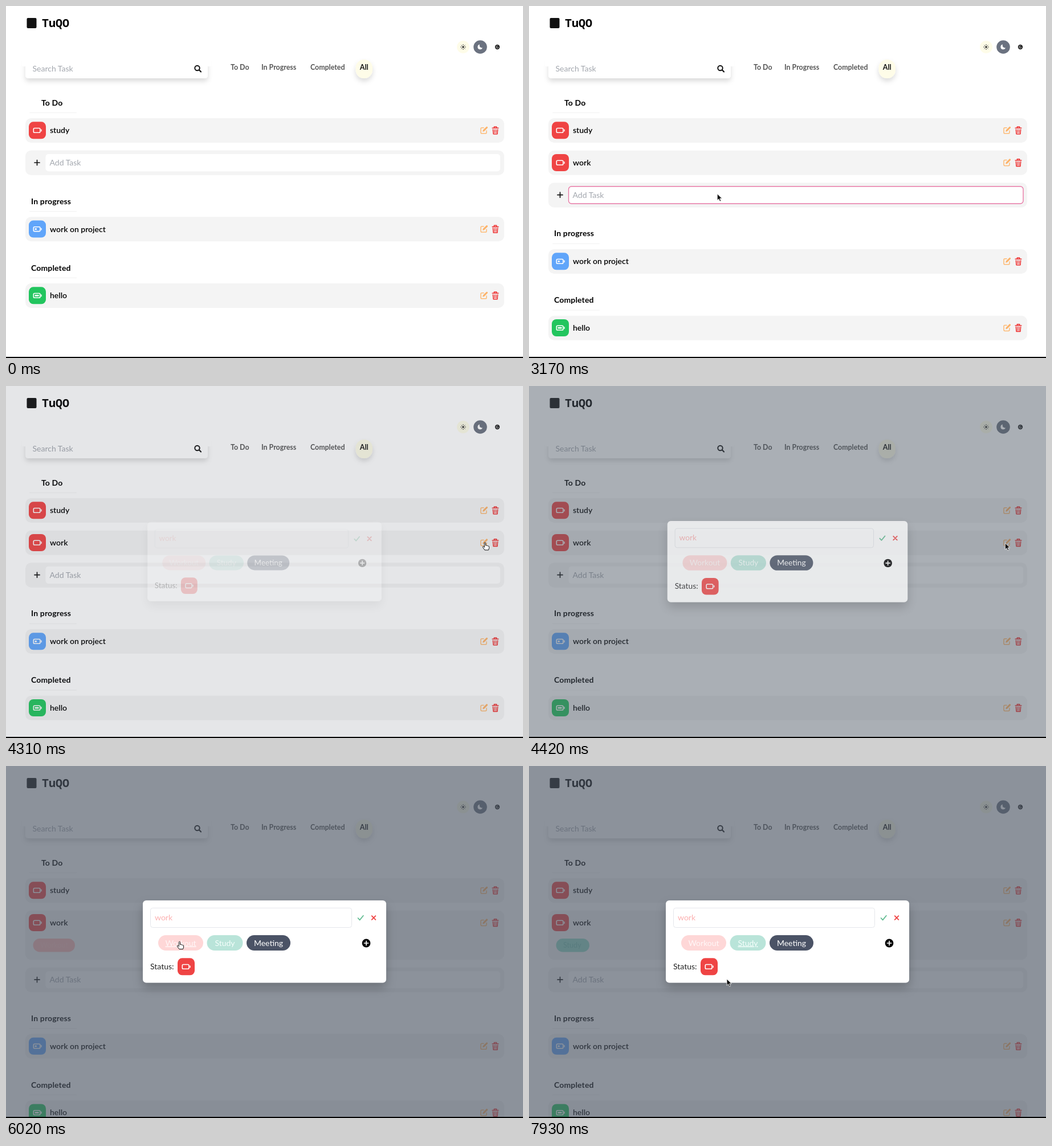
These frames come from a looping animation (907x618 px, 8000 ms). An HTML page:

```html
<!DOCTYPE html>
<html lang="en">
<head>
<meta charset="utf-8">
<title>Task list</title>
<style>
  html, body { margin: 0; width: 100%; height: 100%; overflow: hidden; background: #fff; }
  svg { display: block; width: 100%; height: 100%; }
  text { font: 400 14px Lato, "Open Sans", sans-serif; white-space: pre; }
  .semi { font-weight: 600; }
  .bold { font-weight: 700; letter-spacing: .15px; }
  .nav { font-size: 12.4px; font-weight: 700; fill: #555; }
  .hint { fill: #a3a7ae; }
  .brand { font: 700 20px "Noto Sans Mono", "DejaVu Sans Mono", monospace; }
  .line { fill: none; stroke-linecap: round; stroke-linejoin: round; }
</style>
</head>
<body>
<svg id="stage" viewBox="0 0 907 618" xmlns="http://www.w3.org/2000/svg"></svg>
<script>
const LOOP = 8000;
const RED = '#ef4444', BLUE = '#60a5fa', GREEN = '#22c55e';
const ADD_SHIFT = 56.7, TAG_SHIFT = 43.5;
const T = { focus: 930, type: 2030, added: 2670, move: 3030, click: 4250,
            fade: 4275, workout: 5930, study: 6960 };

const text = (x, y, s, attrs = '') => `<text x="${x}" y="${y}" ${attrs}>${s}</text>`;
const box = (x, y, w, h, r, fill, attrs = '') =>
  `<rect x="${x}" y="${y}" width="${w}" height="${h}" rx="${r}" fill="${fill}" ${attrs}/>`;
const circle = (x, y, r, fill, attrs = '') =>
  `<circle cx="${x}" cy="${y}" r="${r}" fill="${fill}" ${attrs}/>`;
const line = (d, color, w, attrs = '') =>
  `<path class="line" d="${d}" stroke="${color}" stroke-width="${w}" ${attrs}/>`;

// Status button with a battery holding `level` px of charge
const status = (x, y, color, level) =>
  box(x, y, 30, 30, 8, color) +
  box(x + 8.3, y + 11.2, 11.6, 7.8, 1.8, 'none', 'stroke="#fff" stroke-width="1.6"') +
  line(`M${x + 22} ${y + 13.8}v2.6`, '#fff', 1.5) +
  (level ? box(x + 10.6, y + 13.7, level, 2.8, .5, '#fff') : '');

const tools = y =>
  line(`M838 ${y - 4.6}h-3.2q-1.8 0-1.8 1.8v6.4q0 1.8 1.8 1.8h6.4q1.8 0 1.8-1.8v-3`, '#fdba74', 1.5) +
  `<path d="M836.2 ${y + 2.4}l.6-2.9 5.9-5.9q1.2-.6 2 .3q.8.9.2 1.9l-5.9 5.9z" fill="#fdb36a"/>` +
  line(`M853.2 ${y - 4}h10.6M856.4 ${y - 4.3}v-2h4.2v2`, '#e33', 1.6) +
  line(`M854.4 ${y - 1.6}l.7 8h6.8l.7-8`, '#e33', 1.6) +
  line(`M857.2 ${y - 1.5}v5.8M859.8 ${y - 1.5}v5.8`, '#e33', 1.3);

const row = (y, label, color, level, id = '') =>
  box(34, y, 840, 43, 10, '#f4f4f4', id && `id="${id}"`) +
  status(40, y + 6.3, color, level) +
  text(77, y + 26.2, label, 'class="semi"') + tools(y + 21.3);

const heading = (x, y, label) =>
  text(x, y, label, 'class="bold"') + box(41, y + 12.2, 83, 1, .5, '#f1f1f1');

const tag = (id, w, label, fill, ink) =>
  `<g id="${id}">` + box(47.5, 303, w, 23.5, 11.7, fill) +
  text(60, 319, label, `fill="${ink}" style="font-size:12.6px"`) + '</g>';

const pill = (x, w, label, fill, ink, id) =>
  box(x, 297, w, 27, 13.5, fill) +
  text(x + w / 2, 315.6, label, `id="${id}" fill="${ink}" text-anchor="middle"`);

const shadow = (id, dy, blur, alpha) =>
  `<filter id="${id}" x="-30%" y="-60%" width="160%" height="240%">
    <feDropShadow dx="0" dy="${dy}" stdDeviation="${blur}" flood-color="#000" flood-opacity="${alpha}"/></filter>`;

const rays = Array.from({ length: 8 }, (_, i) => {
  const a = i * Math.PI / 4, c = Math.cos(a), s = Math.sin(a);
  return `M${802 + 3.3 * c} ${72 + 3.3 * s}L${802 + 4.3 * c} ${72 + 4.3 * s}`;
}).join('');

const header =
  box(36.5, 21, 17, 18, 2, '#111') + text(63, 37, 'TuQO', 'class="brand"') +
  circle(802, 72, 11, '#fefce8') + circle(802, 72, 1.8, '#222') + line(rays, '#222', 1) +
  circle(832, 72, 11.8, '#6b7280') +
  '<path d="M831 67.6a4.4 4.4 0 1 0 5 5.7a4.2 4.2 0 0 1-5-5.7z" fill="#fff"/>' +
  circle(862, 72, 4.2, '#222') + line('M862.3 70a2 2 0 1 0 1.6 2.4', '#ccc', 1) +
  box(34, 94, 320, 33, 5, '#fff', 'filter="url(#soft)"') + box(28, 84, 332, 22, 0, '#fff') +
  text(46.5, 115, 'Search Task', 'class="hint"') +
  circle(335.5, 109, 4.2, 'none', 'stroke="#111" stroke-width="2"') + line('M338.8 112.3l3.2 3.2', '#111', 2.2) +
  text(394, 112, 'To Do', 'class="nav"') + text(448, 112, 'In Progress', 'class="nav"') +
  text(534, 112, 'Completed', 'class="nav"') +
  box(613.5, 94, 29.5, 33, 14.7, '#fefce8', 'filter="url(#soft)"') +
  text(628.2, 112, 'All', 'class="nav" text-anchor="middle" style="fill:#111"');

const page = header +
  heading(62, 174.6, 'To Do') + row(197, 'study', RED, 0) +
  '<g id="work">' + row(253.7, 'work', RED, 0, 'workBox') +
  tag('tagWorkout', 73.5, 'Workout', '#fdb8b5', '#fdc0bd') +
  tag('tagStudy', 58.5, 'Study', '#8fd9c6', '#6fbfae') + '</g>' +
  '<g id="lower">' + box(34, 253.5, 840, 43.5, 10, '#f4f4f4') +
  line('M50 275h9M54.5 270.5v9', '#111', 1.7) +
  box(69.5, 260, 797.5, 30.3, 5, '#fff', 'id="field" stroke-width="1.4"') +
  text(76.5, 280, 'Add Task', 'id="entry"') +
  heading(44, 347.8, 'In progress') + row(370.3, 'work on project', BLUE, 3.2) +
  heading(44, 464.6, 'Completed') + row(487, 'hello', GREEN, 7) + '</g>';

const modal =
  box(240, 236, 427, 144.5, 6, '#fff', 'filter="url(#deep)"') +
  box(253.5, 249.3, 353, 34.2, 4, '#fff', 'stroke="#e5e7eb"') +
  text(261, 271, 'work', 'fill="#fcb0b0"') +
  line('M617.6 267l3 3.4 6.2-7.6', '#63bd93', 1.8) +
  line('M641.7 263.2l6.6 6.6M648.3 263.2l-6.6 6.6', RED, 1.9) +
  pill(267, 79, 'Workout', '#fed7d7', '#fff7f7', 'pillWorkout') +
  pill(352.5, 63, 'Study', '#b9e4d9', '#f6fffc', 'pillStudy') +
  pill(422, 77, 'Meeting', '#4b5366', '#fff', 'pillMeeting') +
  circle(632, 311, 7.4, '#000') + line('M628.4 311h7.2M632 307.4v7.2', '#fff', 1.7) +
  text(253, 357, 'Status:', 'fill="#222"') + status(301, 337.3, RED, 0);

const cursors =
  `<g id="cursor">
    <path id="arrow" d="M0 0v11.4l2.7-2.5 1.9 4.3 2-.9-1.9-4.2h3.7z" fill="#111" stroke="#fff" stroke-width=".8"/>
    <path id="beam" class="line" d="M-2.5-6q2.5 0 2.5 1.6v8.8q0 1.6-2.5 1.6M2.5-6q-2.5 0-2.5 1.6M0 4.4q0 1.6 2.5 1.6M-1.2.8h2.4" stroke="#222" stroke-width="1.1"/>
    <path id="hand" d="M-1.2 7.2V1q0-1.2 1.1-1.2T1 1v4q1.8-.8 2.2.5 1.7-.6 2.1.6 1.8-.4 1.8 1.3v2.2L6 13H-.6L-3.9 8.4q-.7-1.4.6-1.8 1 0 2.1 1.8z" fill="#fff" stroke="#111" stroke-width="1" stroke-linejoin="round"/>
  </g>`;

const stage = document.getElementById('stage');
stage.innerHTML =
  `<defs>${shadow('soft', 5, 4, .14)}${shadow('deep', 9, 9, .22)}
    <clipPath id="view"><rect width="907" height="616"/></clipPath></defs>
  <rect width="907" height="618" fill="#fff"/>
  <g clip-path="url(#view)">${page}
    <rect id="veil" width="907" height="616" fill="#4b5563"/>
    <g id="modal">${modal}</g>${cursors}</g>
  <rect y="616" width="907" height="2" fill="#000"/>`;

const el = id => document.getElementById(id);
const show = (id, on) => el(id).setAttribute('display', on ? 'inline' : 'none');
const set = (id, attrs) => { for (const k in attrs) el(id).setAttribute(k, attrs[k]); };
const easeOut = p => 1 - (1 - p) ** 2;

// Pointer positions: [time, x, y]
const path = [
  [580, 330, 345], [800, 240, 305], [1090, 194, 280], [T.move, 194, 280],
  [3170, 329, 330], [3400, 620, 300], [3600, 810, 280], [3730, 838, 276],
  [4110, 840.5, 275], [4380, 840.5, 275], [4510, 824, 277.5], [4750, 520, 305],
  [4970, 345, 322], [5400, 312, 312], [5820, 304.5, 308.5], [6510, 304.5, 308.5],
  [6680, 360, 310], [6810, 383, 309], [7210, 383, 309], [7500, 372, 335], [7930, 347, 374]
];

// Pointer look from each time on
const looks = [[0, ''], [580, 'arrow'], [880, 'beam'], [T.type, ''], [T.move, 'arrow'],
  [3690, 'hand'], [4400, 'arrow'], [5250, 'hand'], [7300, 'arrow']];

function pointer(t) {
  const i = path.findIndex(p => p[0] > t);
  if (i < 1) return i ? path.at(-1).slice(1) : path[0].slice(1);
  const [t0, x0, y0] = path[i - 1], [t1, x1, y1] = path[i];
  const p = (t - t0) / (t1 - t0);
  return [x0 + (x1 - x0) * p, y0 + (y1 - y0) * p];
}

function draw(t) {
  const added = t >= T.added, tagged = t >= T.workout, study = t >= T.study;
  show('work', added);
  set('workBox', { height: 43 + (tagged ? TAG_SHIFT : 0) });
  show('tagWorkout', tagged && !study);
  show('tagStudy', study);
  set('lower', { transform: `translate(0 ${(added ? ADD_SHIFT : 0) + (tagged ? TAG_SHIFT : 0)})` });

  const focused = t >= T.focus && t < T.click;
  set('field', { stroke: focused ? '#e879a6' : 'none' });
  const typed = t >= T.type && !added ? 'work'.slice(0, 1 + Math.floor((t - T.type) / 90)) : '';
  el('entry').textContent = typed || 'Add Task';
  set('entry', { fill: typed ? '#222' : '#a3a7ae' });

  const p = easeOut(Math.min(1, Math.max(0, (t - T.fade) / 300)));
  set('veil', { opacity: .64 * p });
  set('modal', {
    opacity: p,
    transform: `translate(453.5 308.2) scale(${.95 + .05 * p}) translate(-453.5 -308.2)`
  });
  show('modal', p > 0);
  set('pillWorkout', { 'text-decoration': tagged && !study ? 'underline' : 'none' });
  set('pillStudy', { 'text-decoration': study ? 'underline' : 'none' });

  const look = looks.findLast(l => t >= l[0])[1];
  for (const id of ['arrow', 'beam', 'hand']) show(id, id === look);
  set('cursor', { transform: `translate(${pointer(t)})` });
}

function tick() {
  draw(performance.now() % LOOP);
  requestAnimationFrame(tick);
}
tick();
</script>
</body>
</html>
```
